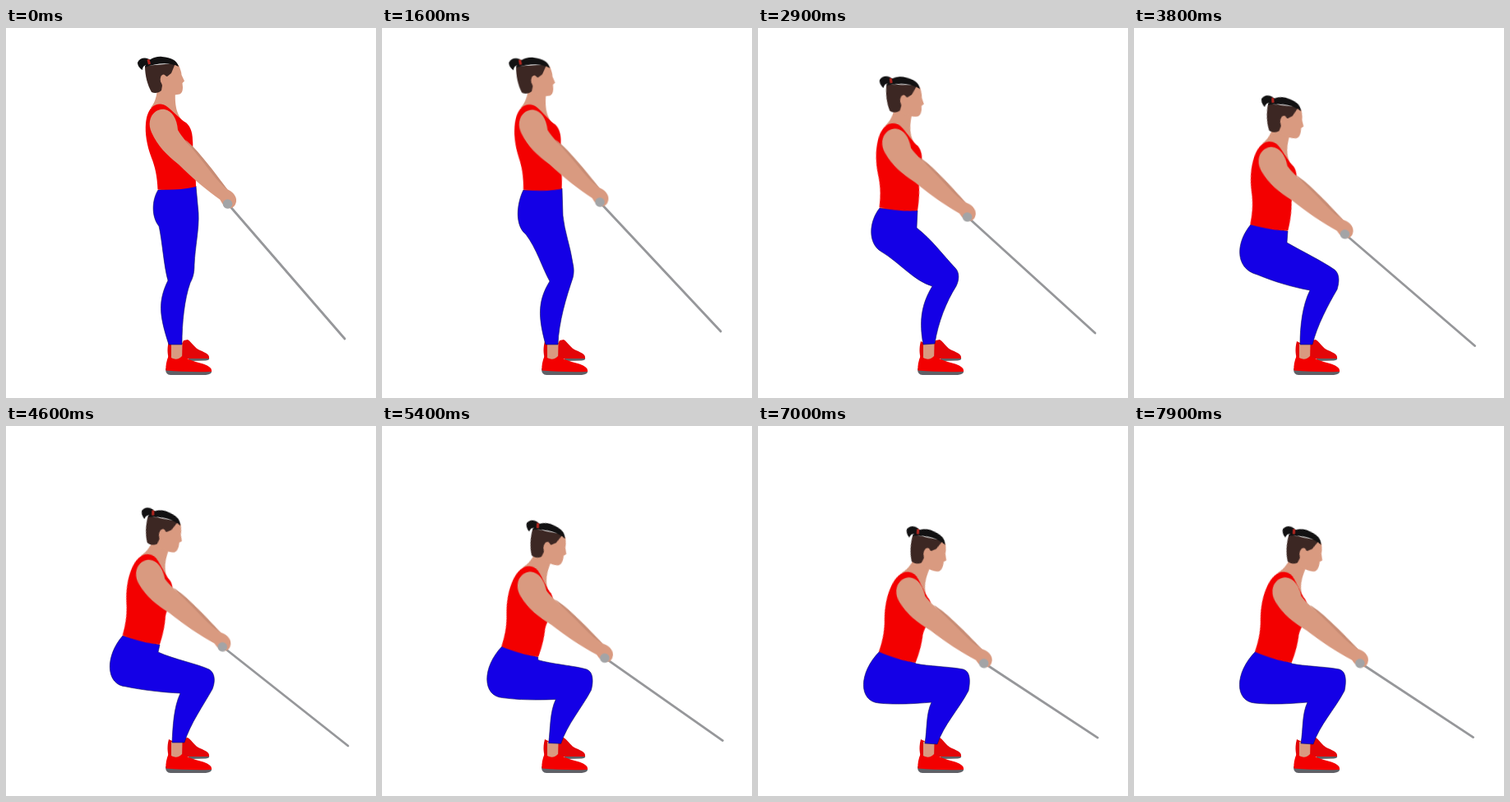
Write an HTML page without scripts that moves like this. It is 450 by 450 pixels and loops after 8000 ms.

```html
<!DOCTYPE html>
<html lang="en">
<head>
<meta charset="utf-8">
<title>Cable squat</title>
<style>
html, body { margin: 0; width: 100%; height: 100%; overflow: hidden; background: #fff; }
svg { display: block; width: 100vw; height: 100vh; }

.skin { fill: #d99a80; }
.red { fill: #f30000; }
.far { fill: #e30508; }
.sole { fill: #5f6167; }
.hair { fill: #3c2723; }
.cap { fill: #121112; }

.head, .torso, .arm, .leg, .rod { animation: 8s linear infinite; }
.head { animation-name: head; transform-origin: 188px 52px; }
.torso { animation-name: torso; transform-origin: 208px 195px; }
.arm { animation-name: arm; transform-origin: 190px 112px; }
.leg { animation-name: leg; fill: #1400e6; stroke: #14105a; stroke-width: .6; }
.rod { animation-name: rod; fill: none; stroke: #96979a; stroke-width: 2.8; stroke-linecap: round; }

@keyframes head {
  0% { transform: none; animation-timing-function: cubic-bezier(.7, 0, .95, .6); }
  20% { transform: translate(-6px, 1px) rotate(2deg); animation-timing-function: cubic-bezier(.4, .1, .8, .75); }
  36.25% { transform: translate(-13.5px, 24.5px) rotate(7deg); }
  47.5% { transform: translate(-7.5px, 49.5px) rotate(12deg); }
  57.5% { transform: translate(1.5px, 68px) rotate(16deg); animation-timing-function: cubic-bezier(.3, .35, .6, 1); }
  77.5%, 100% { transform: translate(17px, 91px) rotate(17deg); }
}
@keyframes torso {
  0% { transform: none; animation-timing-function: cubic-bezier(.7, 0, .95, .6); }
  20% { transform: translate(-12.5px, 1.5px) rotate(3deg); animation-timing-function: cubic-bezier(.4, .1, .8, .75); }
  36.25% { transform: translate(-37px, 25.5px) rotate(9deg); }
  47.5% { transform: translate(-43.5px, 48px) rotate(13.5deg); }
  57.5% { transform: translate(-43.5px, 65.5px) rotate(18deg); animation-timing-function: cubic-bezier(.3, .35, .6, 1); }
  77.5%, 100% { transform: translate(-38.5px, 86.5px) rotate(21deg); }
}
@keyframes arm {
  0% { transform: none; animation-timing-function: cubic-bezier(.7, 0, .95, .6); }
  20% { transform: translate(-8px, .7px) rotate(-2deg); animation-timing-function: cubic-bezier(.4, .1, .8, .75); }
  36.25% { transform: translate(-24px, 23.7px) rotate(-5.3deg); }
  47.5% { transform: translate(-23.6px, 46px) rotate(-6.2deg); }
  57.5% { transform: translate(-17px, 64px) rotate(-6.3deg); animation-timing-function: cubic-bezier(.3, .35, .6, 1); }
  77.5% { transform: translate(-7.2px, 85.5px) rotate(-7.2deg); }
  100% { transform: translate(-6.8px, 85.5px) rotate(-7.2deg); }
}
@keyframes rod {
  0% { d: path("M270 214L412 378"); animation-timing-function: cubic-bezier(.7, 0, .95, .6); }
  20% { d: path("M265 212L412 369"); animation-timing-function: cubic-bezier(.4, .1, .8, .75); }
  36.25% { d: path("M255 230L410 371"); }
  47.5% { d: path("M257 251L414.5 386.5"); }
  57.5% { d: path("M263 268L416 389"); animation-timing-function: cubic-bezier(.3, .35, .6, 1); }
  77.5% { d: path("M274 288L413.5 379.5"); }
  100% { d: path("M275 288L412.5 378.5"); }
}
/* waist, seat, back of knee, hem, kneecap, hip crease */
@keyframes leg {
  0% {
    d: path("M185 197C177 210 177 230 186 241C190 258 192 290 197 307C185 332 186 348 198 385L214 385C214 358 217 330 224 310C228 303 229 296 229 288C230 265 235 245 234 225L231 192Z");
    animation-timing-function: cubic-bezier(.7, 0, .95, .6);
  }
  20% {
    d: path("M172 197C164 213 161 240 175 251C188 268 195 292 204 308C189 332 190 352 199 385L214 385C215 357 224 328 232 304C234 297 233 290 232 286C229 265 222 248 220 228L219 195Z");
    animation-timing-function: cubic-bezier(.4, .1, .8, .75);
  }
  36.25% {
    d: path("M148 219C135 235 133 262 150 272C172 285 190 308 212 314C198 337 196 358 201 385L215 384C219 358 229 333 241 314C245 306 245 297 240 292C224 275 212 258 193 243L194 222Z");
  }
  47.5% {
    d: path("M142 239C123 262 123 293 150 300C172 309 192 315 214 319C205 337 202 362 202 385L217 385C223 361 236 337 247 318C250 308 250 299 244 294C228 283 205 272 186 261L187 247Z");
  }
  57.5% {
    d: path("M142 255C120 280 121 315 146 317C165 321 190 324 212 325C204 342 203 365 202 385L217 385C224 362 240 340 251 320C255 310 254 300 247 296C232 289 205 284 185 275L187 266Z");
    animation-timing-function: cubic-bezier(.3, .35, .6, 1);
  }
  77.5%, 100% {
    d: path("M148 274C122 300 122 335 147 337C166 339 188 338 211 336C204 351 206 368 203 386L218 387C226 363 244 345 256 322C258 312 259 299 250 296C237 293 205 292 192 289L191 288Z");
  }
}
</style>
</head>
<body>
<svg viewBox="0 0 450 450">
  <g class="shoes">
    <path class="sole" d="M220 400L247 401Q248 404 243 404.500L224 405Z"/>
    <path class="far" d="M198 381C196 388 196 396 198 402L247 402C248 397 243 395 236 392C229 389 226 382 221 379L216 380L212 388Z"/>
    <path class="skin" d="M201 384L214.500 384L214 404L201 404Z"/>
    <path class="sole" d="M194 414L250 417Q251 421 243 422L200 422Q194 422 194 414Z"/>
    <path class="red" d="M198 398C195 405 194 411 194.500 416.500C212 418 230 418.500 250 418C251 413 245 410 238 408C229 406 222 403 214 399C210 404 202 404 198 398Z"/>
  </g>

  <path class="leg" d="M185 197C177 210 177 230 186 241C190 258 192 290 197 307C185 332 186 348 198 385L214 385C214 358 217 330 224 310C228 303 229 296 229 288C230 265 235 245 234 225L231 192Z"/>

  <g class="torso">
    <path class="skin" d="M184 74C183 86 180 92 176 97L196 102L214 112C208 104 205 96 206 76Z"/>
    <path class="red" d="M177 97C183 91 191 92 195 95C202 100 209 108 217 114C223 117 227 125 227 137C228 145 226 150 227 158C230 170 231 180 231 193Q208 198 184.500 196.500C184 180 181 168 177 158C171 142 169 128 170 116C171 107 173 101 177 97Z"/>
  </g>

  <g class="head">
    <path class="skin" d="M184 56L199 43L210 45C212 50 213.500 54 213.500 57L217 64.500L214.500 67L215 72C215 78 213 81 208 81C203 82 197 80 186 78Z"/>
    <path class="hair" d="M169 46L206 43L201 55L196 59L192 58L188 63L190 70L189 76C186 79 181 80 177 78C172 69 169 58 169 46Z"/>
    <ellipse class="skin" cx="191.500" cy="62.500" rx="3.800" ry="6"/>
    <path class="cap" d="M169 48C171 39 180 34 190 35C201 36 208 39 210 47C200 42 184 42 169 48Z"/>
    <path class="cap" d="M177 40C172 35 163 35 160 42C160 45 162 49 166 51C166 46 170 44 176 44Z"/>
    <path d="M171.500 38.500L174.500 38L176 43.500L173 44.500Z" fill="#b3261f"/>
  </g>

  <path class="rod" d="M270 214L412 378"/>

  <g class="arm">
    <path d="M218 136C232 146 254 176 270 197L258 192Z" fill="#c88c74"/>
    <path class="skin" d="M175 113C177 103 185 98 193 99C202 101 208 110 209 124C214 133 224 143 234 156C245 169 256 186 268 195.500C276 199 281 205 280 211C279 217 275 220 270 219C264 217 262 211 260 208.500C246 199 226 182 210 166C196 155 184 143 177 127C175 122 174 118 175 113Z"/>
    <circle cx="269.500" cy="214" r="5.800" fill="#a3a4a6"/>
  </g>
</svg>
</body>
</html>
```
